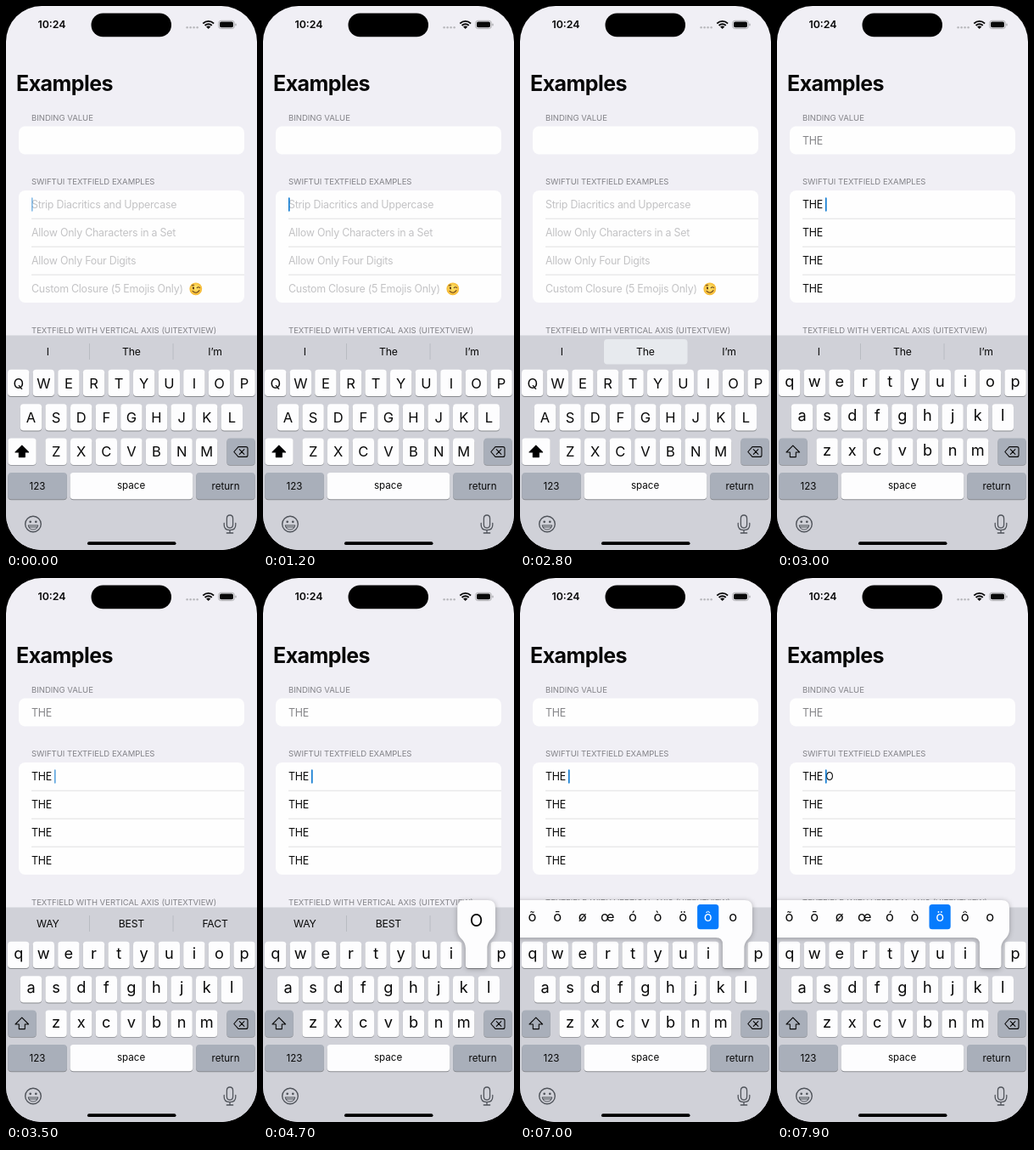
Recreate the animation shown at these times as an HTML page with a canvas. Size 296x640 px, loop 8000 ms.

```html
<!DOCTYPE html>
<html lang="en">
<head>
<meta charset="utf-8">
<title>Text field examples</title>
<style>
  html, body { margin: 0; width: 100%; height: 100%; overflow: hidden; background: #000; }
  canvas { display: block; width: 296px; height: 640px; }
</style>
</head>
<body>
<canvas id="stage" width="296" height="640"></canvas>
<script>
const ctx = document.getElementById('stage').getContext('2d');
const LOOP = 8000, STEP = 100;
const INK = '#080808', KEY = '#fdfdfe', DARK_KEY = '#a9afba', ICON = '#50545b';
const PITCH = 29.6, KEY_W = 25.4, KEY_H = 31.3;
const ROWS = ['qwertyuiop', 'asdfghjkl', 'zxcvbnm'];
const ROW_X = [14.7, 29.5, 59.1], ROW_Y = [427.8, 468.2, 508.6, 549];
const ACCENTS = 'õōøœóòöôo';
const PROMPTS = ['Strip Diacritics and Uppercase', 'Allow Only Characters in a Set',
  'Allow Only Four Digits', 'Custom Closure (5 Emojis Only)'];

// Caret opacity as [time, alpha] stops.
const CARET = [[0, .5], [100, 1], [500, 1], [800, 0], [900, 0], [1200, 1], [1500, 1], [1800, 0],
  [1900, 0], [2100, 1], [2600, 1], [2800, 0], [2900, 0], [3000, 1], [3400, 1], [3700, 0],
  [3800, 0], [4000, 1], [4300, 1], [4500, .5], [4600, .5], [4700, 1], [8000, 1]];

function sample(stops, t) {
  const i = stops.findIndex(s => s[0] > t);
  const [t0, a] = stops[i - 1], [t1, b] = stops[i];
  return a + (b - a) * (t - t0) / (t1 - t0);
}

function box(x, y, w, h, r, color) {
  ctx.fillStyle = color;
  ctx.beginPath();
  ctx.roundRect(x, y, w, h, r);
  ctx.fill();
}

function disc(x, y, r, color) {
  ctx.fillStyle = color;
  ctx.beginPath();
  ctx.arc(x, y, r, 0, Math.PI * 2);
  ctx.fill();
}

function text(str, x, y, { size = 12.4, color = INK, weight = 400, align = 'left', track = 0 } = {}) {
  ctx.font = `${weight} ${size}px Inter, "Liberation Sans", sans-serif`;
  ctx.letterSpacing = track + 'px';
  ctx.textAlign = align;
  ctx.fillStyle = color;
  ctx.fillText(str, x, y);
}

function stroke(path, color, width) {
  ctx.strokeStyle = color;
  ctx.lineWidth = width;
  ctx.lineCap = ctx.lineJoin = 'round';
  ctx.stroke(new Path2D(path));
}

function statusBar() {
  text('10:24', 54, 26.2, { weight: 600, align: 'center' });
  box(100.5, 8.5, 94.5, 27.8, 14, '#000');
  for (let i = 0; i < 4; i++) disc(213.6 + i * 4, 25.2, 1.25, '#b9b9bd');

  ctx.save();
  ctx.beginPath();
  ctx.moveTo(238.7, 27);
  ctx.lineTo(229.7, 18);
  ctx.lineTo(229.7, 12);
  ctx.lineTo(247.7, 12);
  ctx.lineTo(247.7, 18);
  ctx.closePath();
  ctx.clip();
  disc(238.7, 26.6, 3.2, INK);
  ctx.strokeStyle = INK;
  ctx.lineWidth = 1.9;
  for (const r of [5.4, 8.7]) {
    ctx.beginPath();
    ctx.arc(238.7, 26.6, r, Math.PI, 0);
    ctx.stroke();
  }
  ctx.restore();

  ctx.strokeStyle = '#a5a5a9';
  ctx.lineWidth = .9;
  ctx.beginPath();
  ctx.roundRect(250.6, 17.3, 18.8, 9.3, 3);
  ctx.stroke();
  box(252, 18.6, 16, 6.7, 1.8, INK);
  box(270.4, 20.4, 1.2, 3, .6, '#a5a5a9');
}

function winkFace(x, y) {
  const glow = ctx.createRadialGradient(x, y - 2, 1, x, y, 8);
  glow.addColorStop(0, '#ffe36a');
  glow.addColorStop(1, '#f5b52e');
  ctx.save();
  disc(x, y, 7.4, glow);
  ctx.translate(x, y);
  ctx.rotate(-.1);
  ctx.fillStyle = '#65401a';
  ctx.beginPath();
  ctx.ellipse(-2.7, -1.2, 1.1, 1.6, 0, 0, Math.PI * 2);
  ctx.fill();
  stroke('M1.4 -1 Q3.2 -2.8 5 -.8 M-4.2 -4.2 Q-3 -5.3 -1.6 -4.6 M-4 2.2 Q0 6.6 4 2.2', '#65401a', 1);
  ctx.restore();
}

function form(t) {
  const typed = t >= 2900;
  const header = { size: 9.5, color: '#828287' };
  const body = { track: -.23 };
  text('Examples', 12, 100.4, { size: 25, weight: 700, track: -.55 });

  text('BINDING VALUE', 30, 134.6, header);
  box(15, 141.5, 266, 33, 7.5, '#fefefe');
  if (typed) text('THE', 30, 162.6, { ...body, color: '#858588' });

  text('SWIFTUI TEXTFIELD EXAMPLES', 30, 209.8, header);
  box(15, 217, 266, 132, 7.5, '#fefefe');
  PROMPTS.forEach((prompt, i) => {
    const y = 238.4 + i * 33;
    if (i) box(30, 216.7 + i * 33, 251, .8, 0, '#d5d5d8');
    if (!typed) text(prompt, 30, y, { ...body, color: '#c3c3c5' });
    else text(i === 0 && t >= 7900 ? 'THE O' : 'THE', 30, y, body);
  });
  if (!typed) winkFace(223.8, 332.8);

  ctx.globalAlpha = sample(CARET, t);
  box(typed ? 57 : 30, 225.3, 1.6, 16.4, .8, '#0a78d0');
  ctx.globalAlpha = 1;

  text('TEXTFIELD WITH VERTICAL AXIS (UITEXTVIEW)', 30, 384.5, header);
}

function key(x, y, w, color = KEY) {
  box(x, y + .9, w, KEY_H, 4, '#898b90');
  box(x, y, w, KEY_H, 4, color);
}

function suggestions(t) {
  const pressed = t >= 2700 && t < 3000;
  const words = t < 3100 ? ['I', 'The', 'I’m'] : ['WAY', 'BEST', 'FACT'];
  if (pressed) box(99, 392, 98.5, 29.5, 4, '#e7eaee');
  else for (const x of [98, 196.6]) box(x, 397, .9, 19, 0, '#b6b9c0');
  words.forEach((word, i) =>
    text(word, 49.3 + i * 98.6, 411.4, { align: 'center', size: 12.2, track: -.15 }));
}

function keyboard(t) {
  const upper = t < 3000;
  box(0, 387.5, 296, 253, 0, '#d0d1d8');
  suggestions(t);

  ROWS.forEach((row, r) => [...row].forEach((ch, i) => {
    const x = ROW_X[r] + i * PITCH;
    key(x - KEY_W / 2, ROW_Y[r], KEY_W);
    text(upper ? ch.toUpperCase() : ch, x, ROW_Y[r] + (upper ? 21.8 : 20.1),
      { size: upper ? 16.5 : 18.2, align: 'center' });
  }));

  key(2.3, ROW_Y[2], 33.4, upper ? KEY : DARK_KEY);
  const arrow = 'M18.8 517.2 L26.6 525 H22.3 V530.6 H15.3 V525 H11 Z';
  if (upper) {
    ctx.fillStyle = '#000';
    ctx.fill(new Path2D(arrow));
  }
  stroke(arrow, INK, 1.1);

  key(260.4, ROW_Y[2], 33.3, DARK_KEY);
  stroke('M274 518.6 H283 Q285 518.6 285 520.6 V528.4 Q285 530.4 283 530.4 H274 L268.8 524.5 Z' +
    ' M275.3 521.7 L280.9 527.3 M280.9 521.7 L275.3 527.3', INK, 1.1);

  key(2.3, ROW_Y[3], 69.6, DARK_KEY);
  key(75.6, ROW_Y[3], 144.6);
  key(224.2, ROW_Y[3], 69.5, DARK_KEY);
  const label = { size: 11.6, align: 'center' };
  text('123', 37, 569.2, label);
  text('space', 147.6, 568.2, label);
  text('return', 259, 569.2, label);

  ctx.strokeStyle = ICON;
  ctx.lineWidth = 1.4;
  ctx.beginPath();
  ctx.arc(32, 609.5, 9.3, 0, Math.PI * 2);
  ctx.stroke();
  disc(28.7, 606.8, 1.35, ICON);
  disc(35.3, 606.8, 1.35, ICON);
  stroke('M26.2 611 H37.8 Q36.7 616 32 616 Q27.3 616 26.2 611 Z M27 613 H37', ICON, 1.1);

  stroke('M260.4 603 Q260.4 599 264 599 Q267.6 599 267.6 603 V610 Q267.6 614 264 614' +
    ' Q260.4 614 260.4 610 Z M257.2 608.5 V610.5 Q257.2 616.6 264 616.6' +
    ' Q270.8 616.6 270.8 610.5 V608.5 M264 616.6 V620 M260.3 620 H267.7', ICON, 1.3);
  box(96, 630.3, 104.5, 3.8, 1.9, '#000');
}

function callout(wide) {
  const neck = wide
    ? 'V431 Q239 423 231 423 H-20 V379 H265'
    : 'V436 C239 424 229.2 425 229.2 413 V388 Q229.2 379 238 379 H265';
  const shape = new Path2D('M265 379 Q274 379 274 388 V413 C274 425 264.4 424 264.4 436' +
    ' V455 Q264.4 459 260.4 459 H243 Q239 459 239 455 ' + neck + ' Z');
  ctx.save();
  ctx.shadowColor = 'rgba(0,0,0,.28)';
  ctx.shadowBlur = 6;
  ctx.shadowOffsetY = 1;
  ctx.fillStyle = KEY;
  ctx.fill(shape);
  ctx.restore();
}

function accentMenu(t) {
  const chosen = t < 6700 ? 8 : t < 7300 ? 7 : 6;
  callout(true);
  [...ACCENTS].forEach((ch, i) => {
    const x = 14.5 + i * PITCH;
    if (i === chosen) box(x - 12.6, 384, 25.2, 29.2, 3.5, '#067bfd');
    text(ch, x, 403.7, { size: 16.5, align: 'center', color: i === chosen ? '#fff' : INK });
  });
}

function draw(now) {
  const t = Math.floor(now % LOOP / STEP) * STEP;
  ctx.fillStyle = '#000';
  ctx.fillRect(0, 0, 296, 640);
  ctx.save();
  ctx.beginPath();
  ctx.roundRect(0, 0, 296, 640, 42);
  ctx.clip();
  ctx.fillStyle = '#f0eff5';
  ctx.fillRect(0, 0, 296, 640);
  statusBar();
  form(t);
  keyboard(t);
  if (t >= 6100) {
    accentMenu(t);
  } else if (t >= 4500) {
    callout(false);
    text('O', 251.6, 410, { size: 20.5, align: 'center' });
  }
  ctx.restore();
}

const start = performance.now();
function tick() {
  draw(performance.now() - start);
  requestAnimationFrame(tick);
}
tick();
</script>
</body>
</html>
```
